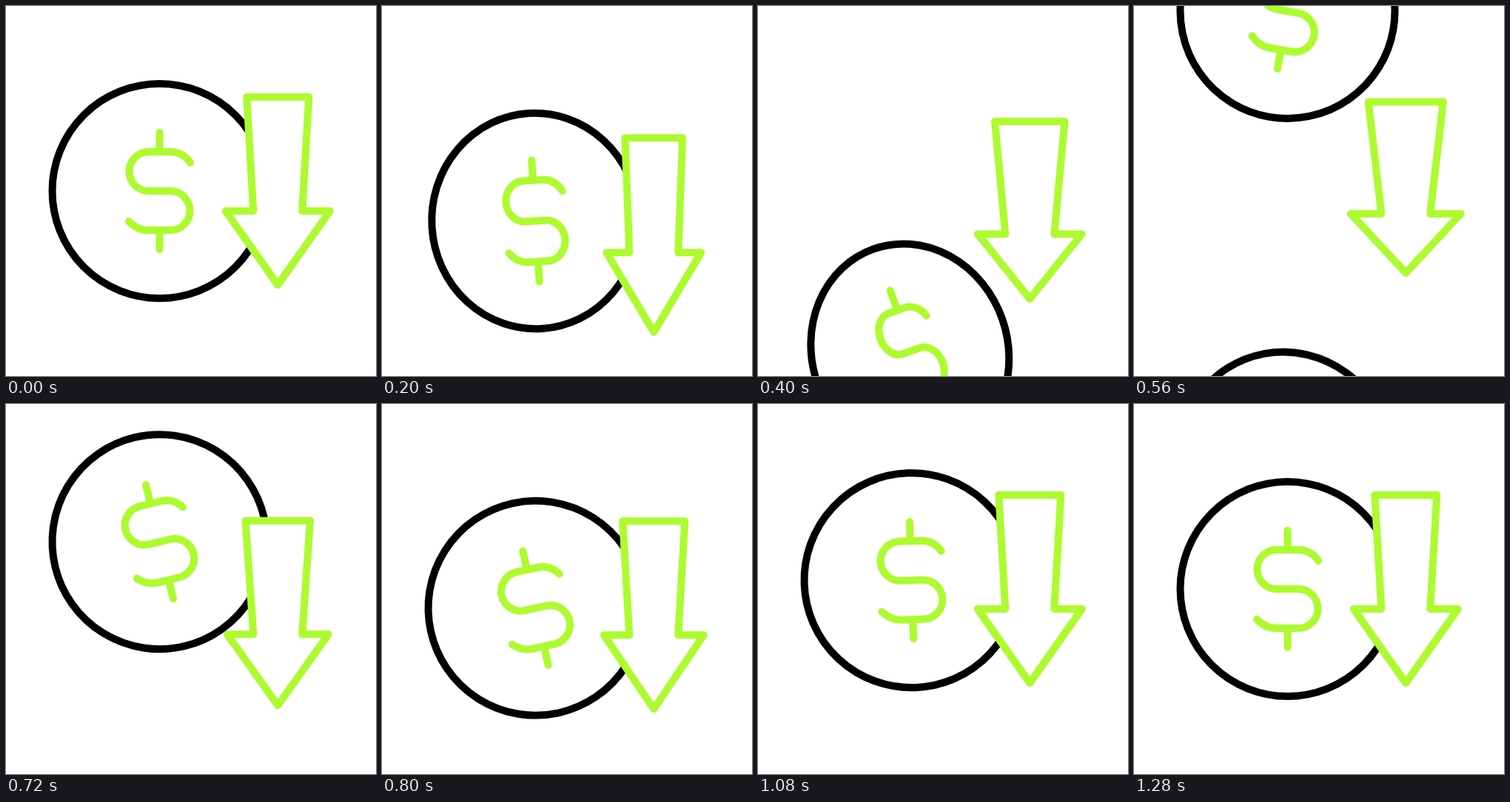
An HTML page that plays this animation: 500x500 px, repeating every 1480 ms.

```html
<!DOCTYPE html>
<html lang="en">
<head>
<meta charset="utf-8">
<title>Falling coin</title>
<style>
  html, body { margin: 0; width: 100%; height: 100%; overflow: hidden; background: #fff; }
  svg { display: block; width: 100vw; height: 100vh; }
  path, ellipse { stroke-width: 10; stroke-linecap: round; stroke-linejoin: round; }
  ellipse { fill: none; stroke: #000; }
  path { fill: none; stroke: #adfb2f; }
  #arrow { fill: #fff; }
</style>
</head>
<body>
<svg viewBox="0 0 500 500">
  <g id="leaving"><ellipse/><path/></g>
  <g id="coming"><ellipse/><path/></g>
  <path id="arrow"/>
</svg>
<script>
const LOOP = 1480, STEP = 40, START = 80;
const COIN_X = 207.5, COIN_Y = 250, R = 145;
const ARROW_X = 367.3, ARROW_Y = 277;

// Cosine easing from each [time, value] turning point to the next.
function swing(t, ...points) {
  let [time, value] = points[0];
  for (const [nextTime, nextValue] of points) {
    if (t < nextTime) {
      const u = Math.max(0, (t - time) / (nextTime - time));
      return value + (nextValue - value) * (1 - Math.cos(Math.PI * u)) / 2;
    }
    [time, value] = [nextTime, nextValue];
  }
  return value;
}

// Distance covered when speeding up evenly to `speed`, then keeping it.
function accelerate(t, speed, rise) {
  return t < rise ? speed * t * t / (2 * rise) : speed * (t - rise / 2);
}

// The old coin tips over as it drops and is squeezed halfway.
function leavingPose(t) {
  const s = Math.max(0, t - START);
  const drop = accelerate(s, .9, 160);
  const squeeze = Math.sin(Math.PI * Math.min(1, s / 560)) ** 2;
  const turn = -.09 * drop;
  return { y: COIN_Y + drop, turn, drift: .12 * turn, squeeze };
}

// The new coin flies in at constant speed, overshoots and settles.
function comingPose(t) {
  const entry = 7 + 1.12 * (t - 560);
  const rebound = swing(t, [806, 282], [1060, 238], [1280, COIN_Y]);
  const turn = swing(t, [460, 21], [720, -13.5], [1200, 0]);
  return { y: Math.min(entry, rebound), turn, drift: 0, squeeze: 0 };
}

function dollar(sx, sy) {
  const p = (x, y) => `${x * sx} ${y * sy}`;
  const arc = (r, sweep, x, y) => `A${p(r, r)} 0 0 ${sweep} ${p(x, y)}`;
  return `M${p(0, -79)}L${p(0, -53)}M${p(0, 53)}L${p(0, 79)}`
    + `M${p(41.5, -38 / sy)}${arc(31, 0, 14.5, -53)}L${p(-14.5, -53)}`
    + `${arc(26.5, 0, -14.5, 0)}L${p(14.5, 0)}${arc(26.5, 1, 14.5, 53)}`
    + `L${p(-14.5, 53)}${arc(37, 1, -41.5, 41 / sy)}`;
}

function drawCoin(id, { y, turn, drift, squeeze }) {
  const coin = document.getElementById(id), [ring, sign] = coin.children;
  coin.setAttribute("transform", `translate(${COIN_X} ${y}) rotate(${turn})`);
  ring.setAttribute("cx", drift);
  ring.setAttribute("rx", R - 13.4 * squeeze);
  ring.setAttribute("ry", R + 2 * squeeze);
  sign.setAttribute("d", dollar(1 - .17 * squeeze, 1 + .1 * squeeze));
}

// Flare widens the top of the shaft and flattens the tip.
function drawArrow(t) {
  const x = ARROW_X;
  const y = swing(t, [START, ARROW_Y], [240, 343], [540, 280], [760, 314], [1040, ARROW_Y]);
  const flare = swing(t, [START, 0], [200, -.35], [520, 1], [800, 0]);
  const top = y - 154 + 3 * flare, tip = y + 100 - 21 * flare;
  const w = 42 + 9 * flare;
  const head = 70.5 + 4.5 * flare - .09 * (y - ARROW_Y);
  const points = [[x - w, top], [x + w, top], [x + 33, y], [x + head, y],
    [x, tip], [x - head, y], [x - 33, y]];
  document.getElementById("arrow").setAttribute("d", `M${points.join("L")}Z`);
}

function draw(ms) {
  const t = Math.floor(ms % LOOP / STEP) * STEP;
  drawCoin("leaving", leavingPose(t));
  drawCoin("coming", comingPose(t));
  drawArrow(t);
}

const start = performance.now();
function tick() {
  draw(performance.now() - start);
  requestAnimationFrame(tick);
}
tick();
</script>
</body>
</html>
```
